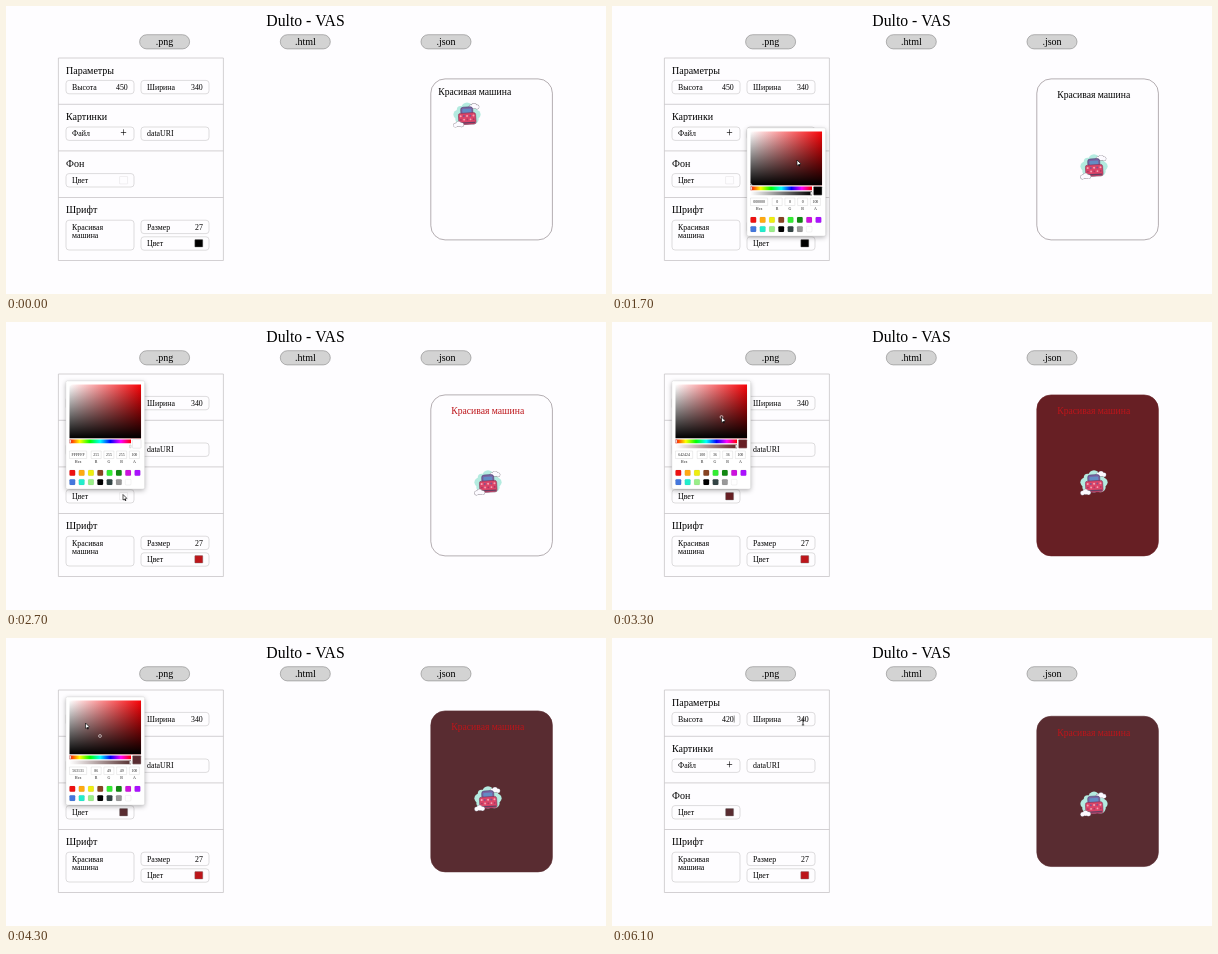
An HTML page with a canvas that plays this animation: 600 by 288 pixels, repeating every 6.2 s.

```html
<!DOCTYPE html>
<html lang="ru">
<head>
<meta charset="utf-8">
<style>
  html, body { margin: 0; width: 100%; height: 100%; overflow: hidden; background: #fefdff; }
  canvas { display: block; width: 600px; height: 288px; }
</style>
</head>
<body>
<canvas id="stage"></canvas>
<script>
const LOOP = 6200, STEP = 100;
const SCALE = 161 / 450; // the page is shown reduced
const PAGE = '#fefdff', EDGE = '#c8c6c8';
const canvas = document.getElementById('stage');
const ctx = canvas.getContext('2d');
const ratio = window.devicePixelRatio || 1;
canvas.width = 600 * ratio;
canvas.height = 288 * ratio;

const PRESETS = 'e11 fa1 ee1 842 3e3 181 c1d a1f 47d 2ec 9e8 000 344 999 fff'.split(' ');
const FONT_PICKER = { x: 134.9, y: 121.9 };
const BACK_PICKER = { x: 59.9, y: 58.9 };
const PAD = 10, AREA_W = 200, AREA_H = 150;

// Key points of the pointer: time, x, y
const POINTER = [
  [0, 440, 40], [300, 470, 86], [600, 483, 90], [700, 461, 108], [1000, 482, 160],
  [1400, 193, 238], [1700, 185, 154], [2000, 200, 140], [2700, 117, 172.5],
  [3300, 109.5, 95], [4100, 94, 98], [4300, 79.5, 85], [4900, 111, 162],
  [5400, 118, 82], [6100, 191, 84]
];

const clamp = (v, lo, hi) => Math.min(hi, Math.max(lo, v));
const mix = (a, b, p) => a + (b - a) * p;
function span(t, from, to) {
  const p = clamp((t - from) / (to - from), 0, 1);
  return p * p * (3 - 2 * p);
}

function pointerAt(t) {
  const next = Math.max(1, POINTER.findIndex(k => k[0] >= t));
  const [t0, x0, y0] = POINTER[next - 1], [t1, x1, y1] = POINTER[next];
  const p = span(t, t0, t1);
  return { x: mix(x0, x1, p), y: mix(y0, y1, p) };
}

// Shade under the pointer in the saturation square, with red as hue
function pick(picker, point) {
  const s = clamp(((point.x - picker.x) / SCALE - PAD) / AREA_W, 0, 1);
  const v = 1 - clamp(((point.y - picker.y) / SCALE - PAD) / AREA_H, 0, 1);
  const r = Math.round(255 * v), g = Math.round(255 * v * (1 - s));
  return { s, v, rgb: [r, g, g], css: `rgb(${r + 3},${Math.max(0, g - 5)},${g})` };
}
const BLACK = { s: 0, v: 0, rgb: [0, 0, 0], css: '#000' };
const WHITE = { s: 0, v: 1, rgb: [255, 255, 255], css: PAGE };

function text(str, x, y, size, color = '#000', align = 'left') {
  ctx.font = `${size}px "Liberation Serif", "Times New Roman", serif`;
  ctx.textAlign = align;
  ctx.fillStyle = color;
  ctx.fillText(str, x, y);
}
const title = (str, x, y, align) => text(str, x, y, 28 * SCALE, '#000', align);
const label = (str, x, y) => text(str, x, y, 22 * SCALE);

function box(x, y, w, h, radius, fill, stroke, width = 0.6) {
  ctx.beginPath();
  ctx.roundRect(x, y, w, h, radius);
  if (fill) { ctx.fillStyle = fill; ctx.fill(); }
  if (stroke) { ctx.strokeStyle = stroke; ctx.lineWidth = width; ctx.stroke(); }
}

function line(x0, y0, x1, y1, color, width) {
  ctx.beginPath();
  ctx.moveTo(x0, y0);
  ctx.lineTo(x1, y1);
  ctx.strokeStyle = color;
  ctx.lineWidth = width;
  ctx.stroke();
}

function disc(x, y, r, fill) {
  ctx.beginPath();
  ctx.arc(x, y, r, 0, 7);
  ctx.fillStyle = fill;
  ctx.fill();
}

function drawHeader() {
  text('Dulto - VAS', 299.5, 19.8, 44 * SCALE, '#000', 'center');
  ['.png', '.html', '.json'].forEach((name, i) => {
    const x = 133.6 + i * 140.7;
    box(x, 28.7, 50, 14.2, 7.1, '#d3d3d3', '#858585');
    title(name, x + 25, 39.2, 'center');
  });
}

const rowY = i => 74.4 + i * 46.6;

function field(x, y, name, value) {
  box(x, y, 68, 13.4, 3, PAGE, EDGE);
  label(name, x + 6, y + 9.3);
  if (value) label(value, x + 62 - value.length * 4, y + 9.3);
}

function swatch(x, y, shade) {
  box(x, y, 8, 7.4, 0.4, shade.css, shade === WHITE ? '#dcdadc' : '#777', 0.4);
}

function drawPanel(height, fontShade, backShade, caret) {
  box(52.4, 52, 165, 202.5, 0, null, EDGE, 0.8);
  ['Параметры', 'Картинки', 'Фон', 'Шрифт'].forEach((name, i) => {
    title(name, 60, rowY(i) - 6.8);
    if (i) line(52.4, rowY(i) - 22.7, 217.4, rowY(i) - 22.7, EDGE, 0.8);
  });
  field(60, rowY(0), 'Высота', String(height));
  field(135, rowY(0), 'Ширина', '340');
  field(60, rowY(1), 'Файл');
  field(135, rowY(1), 'dataURI');
  field(60, rowY(2), 'Цвет');
  field(135, rowY(3), 'Размер', '27');
  field(135, rowY(3) + 16.6, 'Цвет');
  box(60, rowY(3), 68, 29.8, 3, PAGE, EDGE);
  label('Красивая', 66, 224);
  label('машина', 66, 232);
  text('+', 117.6, 131.2, 11.5, '#000', 'center');
  swatch(113.6, rowY(2) + 2.9, backShade);
  swatch(188.8, rowY(3) + 19.4, fontShade);
  if (caret) line(122.2, 77.5, 122.2, 84.5, '#222', 0.5);
}

function cloud(x, y) {
  const puffs = [-1, 0, 1].map(i => [x + i * 3, y + Math.abs(i), 2.9 - Math.abs(i) * 0.5]);
  puffs.forEach(([px, py, r]) => disc(px, py, r, '#8d8790'));
  puffs.forEach(([px, py, r]) => disc(px, py, r - 0.4, '#fcfaff'));
}

function drawCar(x, y) {
  ctx.save();
  ctx.translate(x, y);
  for (let i = 0; i < 8; i++) {
    const a = i * Math.PI / 4;
    disc(Math.cos(a) * 9, Math.sin(a) * 6.5, 4.6 + Math.sin(a * 3), '#b4ebe0');
  }
  cloud(7, -8.5);
  ctx.rotate(-0.06);
  box(-6, -7.5, 12, 8, 2.5, '#7a64a4', '#4b406f');
  box(-4.4, -5.6, 8.8, 4, 1, '#628cc4');
  box(-8.6, -1.5, 17.2, 11.4, 2, '#dc4468', '#7c3458');
  for (let i = -2; i <= 2; i++) {
    disc(i * 3.2, 1.4, 1, i % 2 ? '#81518b' : '#f4a5b5');
    disc(i * 3.2, 5, 0.9, i % 2 ? '#f4a5b5' : '#a83a65');
  }
  line(-7.5, 8.3, 7.5, 8.3, '#634064', 1.4);
  cloud(-9, 9);
  ctx.restore();
}

function drawCard(t, height, fontShade, backShade) {
  const h = height * SCALE, top = 153.4 - h / 2;
  box(424.8, top, 121.6, h, 14.3, backShade.css, backShade === WHITE ? '#82787c' : backShade.css);
  const moved = span(t, 300, 600), carMoved = span(t, 700, 1000);
  drawCar(mix(461, 482, carMoved), top + mix(35.6, 87.4, carMoved));
  text('Красивая машина', mix(432.2, 445.2, moved), top + mix(15.7, 19.5, moved), 27 * SCALE, fontShade.css);
}

function fade(x, y, w, h, dx, dy, colors) {
  const g = ctx.createLinearGradient(x, y, x + w * dx, y + h * dy);
  colors.forEach((c, i) => g.addColorStop(i / (colors.length - 1), c));
  box(x, y, w, h, 0, g);
}

// Drawn in unreduced page pixels
function drawPicker(origin, shade) {
  ctx.save();
  ctx.translate(origin.x, origin.y);
  ctx.scale(SCALE, SCALE);
  ctx.shadowColor = 'rgba(0,0,0,.3)';
  ctx.shadowBlur = 5 * ratio;
  ctx.shadowOffsetY = 1.5 * ratio;
  box(0, 0, 220, 302, 4, '#fff');
  ctx.shadowColor = 'transparent';
  box(0, 0, 220, 302, 4, null, '#d0ced0', 1);

  fade(PAD, PAD, AREA_W, AREA_H, 1, 0, ['#fff', '#f80408']);
  fade(PAD, PAD, AREA_W, AREA_H, 0, 1, ['rgba(0,0,0,0)', '#000']);
  ctx.beginPath();
  ctx.arc(PAD + shade.s * AREA_W, PAD + (1 - shade.v) * AREA_H, 4, 0, 7);
  ctx.strokeStyle = '#fff';
  ctx.lineWidth = 1.6;
  ctx.stroke();

  const rgb = shade.rgb.join();
  const hues = Array.from({ length: 7 }, (_, i) => `hsl(${i * 60},100%,50%)`);
  fade(PAD, 164, 172, 10, 1, 0, hues);
  fade(PAD, 178, 172, 10, 1, 0, [`rgba(${rgb},0)`, `rgb(${rgb})`]);
  box(PAD, 165, 4, 8, 1, '#fff', '#999', 1);
  box(PAD + 168, 179, 4, 8, 1, '#fff', '#999', 1);
  box(186, 164, 24, 24, 2, shade.css, '#c8c8c8', 1);

  const hex = shade.rgb.map(c => c.toString(16).padStart(2, '0')).join('').toUpperCase();
  [hex, ...shade.rgb, 100].forEach((value, i) => {
    const cx = i ? 49 + i * 35.6 : 34, w = i ? 28 : 48;
    box(cx - w / 2, 196, w, 21, 0, null, '#ccc', 1);
    text(value, cx, 211, 11, '#222', 'center');
    text(['Hex', ...'RGBA'][i], cx, 230, 11, '#222', 'center');
  });
  PRESETS.forEach((color, i) =>
    box(PAD + (i % 8) * 26, 249 + Math.floor(i / 8) * 26, 16, 16, 3, '#' + color, 'rgba(0,0,0,.15)', 1));
  ctx.restore();
}

function drawPointer({ x, y }, beam) {
  if (beam) {
    line(x, y - 3, x, y + 3, '#111', 0.8);
    for (const side of [-3, 3]) line(x - 1.2, y + side, x + 1.2, y + side, '#111', 0.7);
    return;
  }
  line(x + 1.3, y + 3, x + 2.7, y + 6.2, '#111', 1.4);
  ctx.beginPath();
  ctx.moveTo(x, y);
  ctx.lineTo(x, y + 5.4);
  ctx.lineTo(x + 3.8, y + 3.8);
  ctx.closePath();
  ctx.fillStyle = '#fff';
  ctx.strokeStyle = '#111';
  ctx.lineWidth = 0.7;
  ctx.fill();
  ctx.stroke();
}

function draw(t) {
  ctx.setTransform(ratio, 0, 0, ratio, 0, 0);
  ctx.fillStyle = PAGE;
  ctx.fillRect(0, 0, 600, 288);

  const fontShade = t < 1800 ? BLACK : pick(FONT_PICKER, pointerAt(Math.min(t, 2000)));
  const backShade = t < 3000 ? WHITE : pick(BACK_PICKER, pointerAt(Math.min(t, 4100)));
  const height = t < 5800 ? 450 : 420;

  drawHeader();
  drawPanel(height, fontShade, backShade, t >= 5400);
  drawCard(t, height, fontShade, backShade);
  if (t >= 1500 && t < 2300) drawPicker(FONT_PICKER, fontShade);
  if (t >= 2600 && t < 4700) drawPicker(BACK_PICKER, backShade);
  if (t >= 100) drawPointer(pointerAt(t), t >= 5300);
}

function tick() {
  const t = performance.now() % LOOP;
  draw(Math.floor(t / STEP) * STEP);
  requestAnimationFrame(tick);
}
tick();
</script>
</body>
</html>
```
